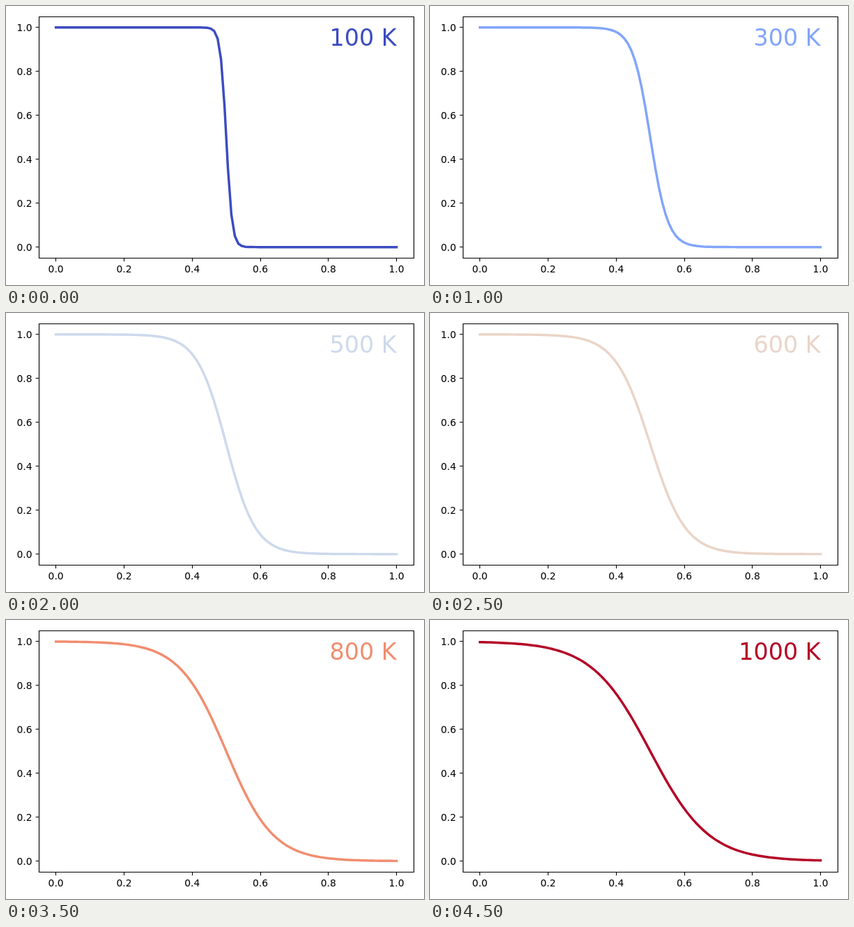
An HTML page that plays this animation: 600 px wide and 400 px high, repeating every 5000 ms.

```html
<!DOCTYPE html>
<html lang="en">
<head>
<meta charset="utf-8">
<title>Fermi function</title>
<style>
  html, body { margin: 0; width: 100%; height: 100%; overflow: hidden; background: #fff; }
  svg { display: block; font-family: "DejaVu Sans", sans-serif; font-size: 13.89px; }
  #axes { fill: none; stroke: #000; stroke-width: 1.11; }
  #curve { fill: none; stroke-width: 3.47; stroke-linejoin: round; stroke-linecap: square; }
  #label { font-size: 33.33px; text-anchor: end; }
</style>
</head>
<body>
<svg width="600" height="400" viewBox="0 0 600 400">
  <g id="ticks"></g>
  <path id="curve"/>
  <path id="axes"/>
  <text id="label" x="560.6" y="57"></text>
</svg>
<script>
const BOLTZMANN = 8.617e-5, FERMI_LEVEL = 0.5, POINTS = 100, STEP_MS = 500;
const COLORS = ["#3b4cc0", "#5d7ce5", "#82a5fb", "#aac7fd", "#cdd9ec",
                "#ead4c7", "#f7b89c", "#f18d6f", "#da5848", "#b40426"];
const $ = id => document.getElementById(id);
const px = v => 71.65 + 488.95 * v;
const py = v => 345.65 - 314.9 * v;
const snap = v => Math.floor(v) + 0.5;

function drawAxes() {
  let path = "M47.5 15.5H585.5V361.5H47.5Z", labels = "";
  for (let i = 0; i <= 5; i++) {
    const v = i / 5, text = v.toFixed(1);
    path += `M${snap(px(v))} 361.5v4.86M47.5 ${snap(py(v))}h-4.86`;
    labels += `<text x="${px(v)}" y="382" text-anchor="middle">${text}</text>`
            + `<text x="37.5" y="${Math.round(py(v) + 5)}" text-anchor="end">${text}</text>`;
  }
  $("axes").setAttribute("d", path);
  $("ticks").innerHTML = labels;
}

function drawCurve(step) {
  const kelvin = 100 * (step + 1);
  const points = Array.from({ length: POINTS }, (_, i) => {
    const energy = i / (POINTS - 1);
    const filled = 1 / (Math.exp((energy - FERMI_LEVEL) / (BOLTZMANN * kelvin)) + 1);
    return px(energy).toFixed(2) + " " + py(filled).toFixed(2);
  });
  $("curve").setAttribute("d", "M" + points.join("L"));
  $("curve").setAttribute("stroke", COLORS[step]);
  $("label").setAttribute("fill", COLORS[step]);
  $("label").textContent = kelvin + " K";
}

let start, shown = 0;
function tick(now) {
  start ??= now;
  const step = Math.floor((now - start) / STEP_MS) % COLORS.length;
  if (step !== shown) drawCurve(shown = step);
  requestAnimationFrame(tick);
}

drawAxes();
drawCurve(0);
requestAnimationFrame(tick);
</script>
</body>
</html>
```
